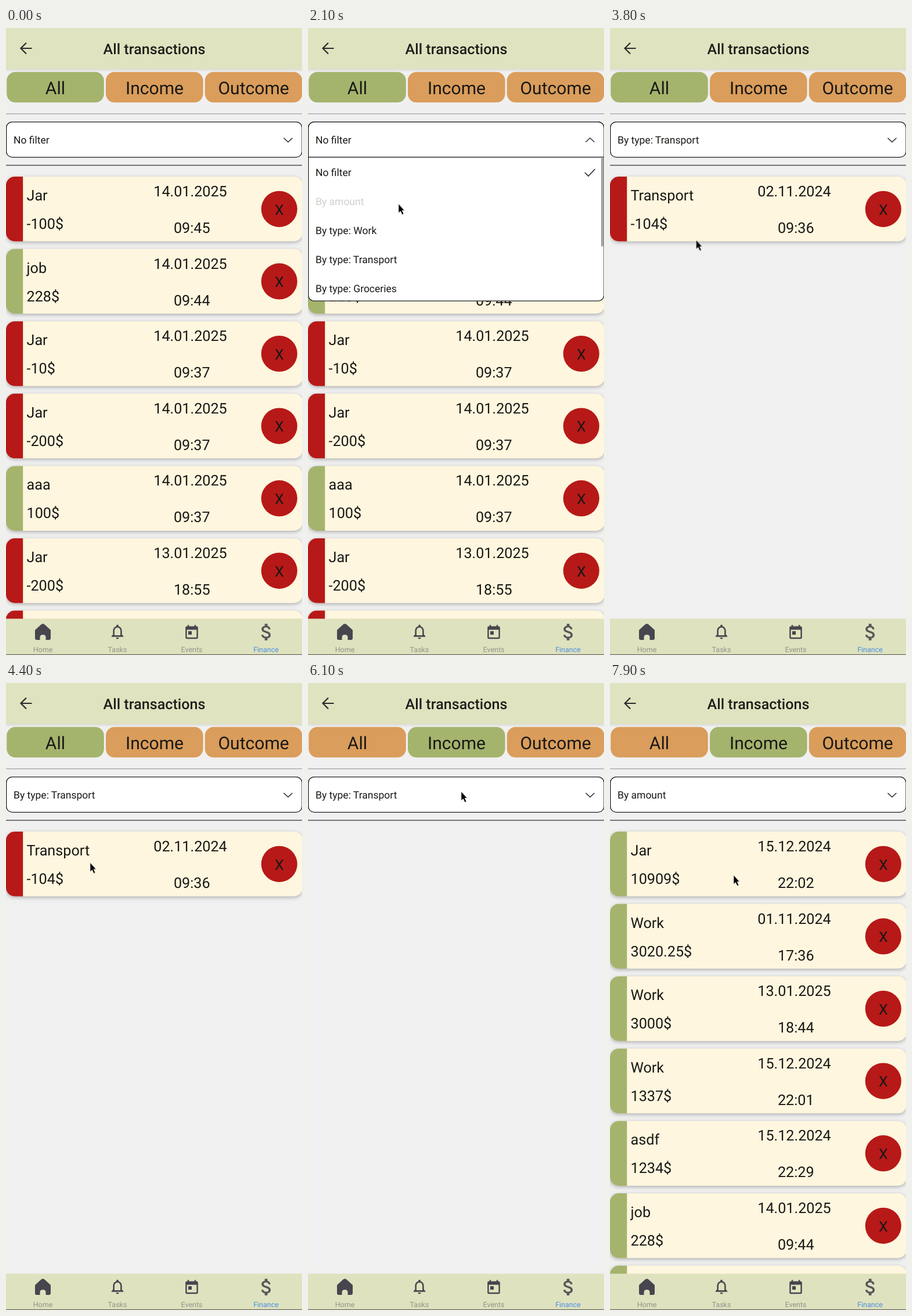
Animation of 510x1080 px, one loop 8000 ms. Source, as an HTML page:

```html
<!DOCTYPE html>
<html lang="en">
<head>
<meta charset="utf-8">
<title>All transactions</title>
<style>
html, body { margin: 0; width: 100%; height: 100%; overflow: hidden; background: #f0f0f0; }
svg { display: block; width: 100%; height: 100%; font-family: Roboto, sans-serif; fill: #181816; text-rendering: geometricPrecision; }
.mid { text-anchor: middle; }
.title { font-size: 25.1px; font-weight: 500; fill: #1e1e1b; }
.tab { font-size: 30.1px; }
.item { font-size: 17.5px; }
.card text { font-size: 25.2px; }
.card .sheet { fill: #fef6de; filter: drop-shadow(0 2px 3px rgba(0, 0, 0, .28)); }
.in { fill: #a4b46d; }
.out { fill: #b71918; }
.nav text { font-size: 12.5px; fill: #929389; }
.nav path { fill: #47454e; }
.line { fill: none; stroke: #2a2a2a; stroke-width: 1.6; }
.box { fill: #fff; stroke: #1c1c1c; stroke-width: 1.2; }

/* 1% = 80 ms */
.loop { animation: 8s step-end infinite; }
.until-amount { animation-name: untilAmount; }
.amount { animation-name: amount; }
.amount-label { animation-name: amountLabel; }
.transport { animation-name: transport; }
.transport-label { animation-name: transportLabel; }
.first-label { animation-name: firstLabel; }
.open { animation-name: open; }
.closed { animation-name: closed; }
.tab-all { animation-name: tabAll; }
.tab-income { animation-name: tabIncome; }
.press { animation: press 8s linear infinite; }
.press-amount { animation: pressAmount 8s linear infinite; }
.press-transport { animation: pressTransport 8s linear infinite; }
.cursor { animation: move 8s ease-in-out infinite; }

@keyframes untilAmount { 0% { visibility: visible } 28.75%, 100% { visibility: hidden } }
@keyframes amount {
  0% { visibility: hidden } 28.75% { visibility: visible }
  43.75% { visibility: hidden } 91.25%, 100% { visibility: visible }
}
@keyframes firstLabel { 0% { visibility: visible } 27.5%, 100% { visibility: hidden } }
@keyframes amountLabel {
  0% { visibility: hidden } 27.5% { visibility: visible }
  43.75% { visibility: hidden } 90.625%, 100% { visibility: visible }
}
@keyframes transport { 0% { visibility: hidden } 43.75% { visibility: visible } 70%, 100% { visibility: hidden } }
@keyframes transportLabel { 0% { visibility: hidden } 43.75% { visibility: visible } 90.625%, 100% { visibility: hidden } }
@keyframes open {
  0%, 27.5%, 43.75%, 90.625%, 100% { opacity: 0 }
  17.5%, 37.5%, 80.625% { opacity: 1 }
}
@keyframes closed {
  0%, 27.5%, 43.75%, 90.625%, 100% { opacity: 1 }
  17.5%, 37.5%, 80.625% { opacity: 0 }
}
@keyframes tabAll { 0% { fill: #a4b46d } 70%, 100% { fill: #da9d5b } }
@keyframes tabIncome { 0% { fill: #da9d5b } 70%, 100% { fill: #a4b46d } }
@keyframes press { 0%, 34.5%, 39%, 100% { opacity: 1 } 35.5%, 37% { opacity: .22 } }
@keyframes pressAmount {
  0%, 24.5%, 29%, 88%, 92%, 100% { opacity: 1 }
  25.5%, 27.5%, 89%, 90.5% { opacity: .2 }
}
@keyframes pressTransport { 0%, 41.5%, 45%, 100% { opacity: 1 } 42.5%, 43.75% { opacity: .2 } }
@keyframes move {
  0%, 5% { transform: translate(520px, 420px) }
  15%, 17.5% { transform: translate(218px, 196px) }
  23.75%, 28% { transform: translate(156px, 303px) }
  33.75%, 37.5% { transform: translate(164.5px, 223.5px) }
  41.9%, 44.4% { transform: translate(150px, 390px) }
  52.5%, 58.75% { transform: translate(145px, 309.5px) }
  66.25%, 70.6% { transform: translate(258px, 108px) }
  76.25%, 80.6% { transform: translate(264px, 187px) }
  85% { transform: translate(208px, 260px) }
  87.5%, 90.6% { transform: translate(205px, 296px) }
  98.75%, 100% { transform: translate(213px, 331px) }
}
</style>
</head>
<body>
<svg viewBox="0 0 510 1080" preserveAspectRatio="none">
  <defs>
    <linearGradient id="shade" x2="0" y2="1">
      <stop stop-color="#d9d9d4"/><stop offset="1" stop-color="#f0f0f0"/>
    </linearGradient>
  </defs>
  <rect width="510" height="1080" fill="#f0f0f0"/>

  <g id="all" class="loop until-amount"></g>
  <g id="amount" class="loop amount"></g>
  <g id="transport" class="loop transport"></g>

  <rect y="70" width="510" height="6" fill="url(#shade)"/>
  <rect width="510" height="70.5" fill="#e0e3bf"/>
  <path class="line" style="stroke-width:2.2" d="M44.5 35H26M35 25.5L25.5 35l9.5 9.5"/>
  <text class="title mid" x="255.5" y="44.5">All transactions</text>

  <g fill="#da9d5b">
    <rect class="loop tab-all" x="1.2" y="75.7" width="167.6" height="52.6" rx="15"/>
    <rect class="loop tab-income" x="172" y="75.7" width="167.6" height="52.6" rx="15"/>
    <rect x="342.8" y="75.7" width="167.6" height="52.6" rx="15"/>
  </g>
  <g class="tab mid">
    <text x="85" y="114">All</text>
    <text x="256" y="114">Income</text>
    <text x="426.6" y="114">Outcome</text>
  </g>
  <path d="M0 147.8H510" stroke="#adadad" stroke-width="1.6"/>
  <path d="M0 236.5H510" stroke="#4c4c4c" stroke-width="1.6"/>

  <rect class="box press" x=".6" y="161.8" width="509.4" height="60.8" rx="10"/>

  <g class="loop open">
    <rect class="box" x=".6" y="161.8" width="509.4" height="308.4" rx="10"/>
    <path class="line" style="stroke-width:1.3" d="M0 222.5H510M478.5 196.5l7.5-7 7.5 7"/>
    <rect x="505" y="224" width="4.5" height="152" fill="#a3a3a3"/>
    <g class="item">
      <text x="13" y="255">No filter</text>
      <text class="press-amount" x="13" y="305">By amount</text>
      <text x="13" y="355">By type: Work</text>
      <text class="press-transport" x="13" y="405">By type: Transport</text>
      <text x="13" y="454.5">By type: Groceries</text>
    </g>
    <g class="line">
      <path class="loop first-label" d="M477 249l6 6 11.5-12"/>
      <path class="loop amount-label" d="M477 299l6 6 11.5-12"/>
      <path class="loop transport-label" d="M477 398.5l6 6 11.5-12"/>
    </g>
  </g>

  <g class="item press">
    <text class="loop first-label" x="13" y="199">No filter</text>
    <text class="loop amount-label" x="13" y="199">By amount</text>
    <text class="loop transport-label" x="13" y="199">By type: Transport</text>
    <path class="line loop closed" d="M478.5 189.500l7.5 7 7.5-7"/>
  </g>

  <g class="nav mid">
    <rect y="1017.5" width="510" height="63" fill="#dfe2be"/>
    <rect y="1078.8" width="510" height="1.2" fill="#66675b"/>
    <path d="M50 1037L60.5 1027.5q3-2.500 6 0L77 1037V1051q0 3-3 3H68.5V1049.500q0-4.500-5-4.500t-5 4.500V1054H53q-3 0-3-3Z"/>
    <path transform="translate(176.8 1024.5) scale(1.27)" d="M12 22c1.1 0 2-.9 2-2h-4c0 1.1.89 2 2 2zm6-6v-5c0-3.07-1.64-5.64-4.5-6.32V4c0-.83-.67-1.5-1.5-1.5s-1.5.67-1.5 1.5v.68C7.63 5.36 6 7.92 6 11v5l-2 2v1h16v-1l-2-2zm-2 1H8v-6c0-2.48 1.51-4.5 4-4.5s4 2.02 4 4.5v6z"/>
    <path transform="translate(305.6 1027) scale(1.2)" d="M19 3h-1V1h-2v2H8V1H6v2H5c-1.11 0-1.99.9-1.99 2L3 19c0 1.1.89 2 2 2h14c1.1 0 2-.9 2-2V5c0-1.1-.9-2-2-2zm0 16H5V8h14v11zM7 10h5v5H7z"/>
    <path style="fill:#55555a" transform="translate(430 1021.5) scale(1.58)" d="M11.8 10.9c-2.27-.59-3-1.2-3-2.15 0-1.09 1.01-1.85 2.7-1.85 1.78 0 2.44.85 2.5 2.1h2.21c-.07-1.72-1.12-3.3-3.21-3.81V3h-3v2.16c-1.94.42-3.5 1.68-3.5 3.61 0 2.31 1.91 3.46 4.7 4.13 2.5.6 3 1.48 3 2.41 0 .69-.49 1.79-2.7 1.79-2.06 0-2.87-.92-2.98-2.1h-2.2c.12 2.19 1.76 3.42 3.68 3.83V21h3v-2.15c1.95-.37 3.5-1.5 3.5-3.55 0-2.84-2.43-3.81-4.7-4.4z"/>
    <text x="63.5" y="1075">Home</text>
    <text x="192" y="1075">Tasks</text>
    <text x="320" y="1075">Events</text>
    <text x="448" y="1075" style="fill:#4a8fe8">Finance</text>
  </g>

  <path class="cursor" fill="#000" stroke="#fff" stroke-opacity=".7" stroke-width=".8"
    d="M0 0V15.5l3.4-3.1 2.9 6 2.6-1.2-2.9-5.9H10.2z"/>
</svg>
<script>
const lists = {
  all: [
    ['Jar', '-100$', '14.01.2025', '09:45'],
    ['job', '228$', '14.01.2025', '09:44'],
    ['Jar', '-10$', '14.01.2025', '09:37'],
    ['Jar', '-200$', '14.01.2025', '09:37'],
    ['aaa', '100$', '14.01.2025', '09:37'],
    ['Jar', '-200$', '13.01.2025', '18:55'],
    ['', '-', '', '']
  ],
  amount: [
    ['Jar', '10909$', '15.12.2024', '22:02'],
    ['Work', '3020.25$', '01.11.2024', '17:36'],
    ['Work', '3000$', '13.01.2025', '18:44'],
    ['Work', '1337$', '15.12.2024', '22:01'],
    ['asdf', '1234$', '15.12.2024', '22:29'],
    ['job', '228$', '14.01.2025', '09:44'],
    ['', '', '', '']
  ],
  transport: [['Transport', '-104$', '02.11.2024', '09:36']]
};

const card = ([name, sum, date, time], i) => `
  <g class="card" transform="translate(0 ${256 + i * 124.6})">
    <rect class="sheet" width="511" height="111.5" rx="15"/>
    <path class="${sum.startsWith('-') ? 'out' : 'in'}" d="M29.2 0H15a15 15 0 0 0-15 15V96.5a15 15 0 0 0 15 15H29.2z"/>
    <text x="35.5" y="41">${name}</text>
    <text x="35.5" y="90">${sum}</text>
    <text class="mid" x="317.5" y="34">${date}</text>
    <text class="mid" x="320.3" y="97">${time}</text>
    <circle class="out" cx="470.8" cy="55.8" r="31.1"/>
    <text class="mid" x="471" y="65.5">X</text>
  </g>`;

for (const id in lists) document.getElementById(id).innerHTML = lists[id].map(card).join('');
</script>
</body>
</html>
```
